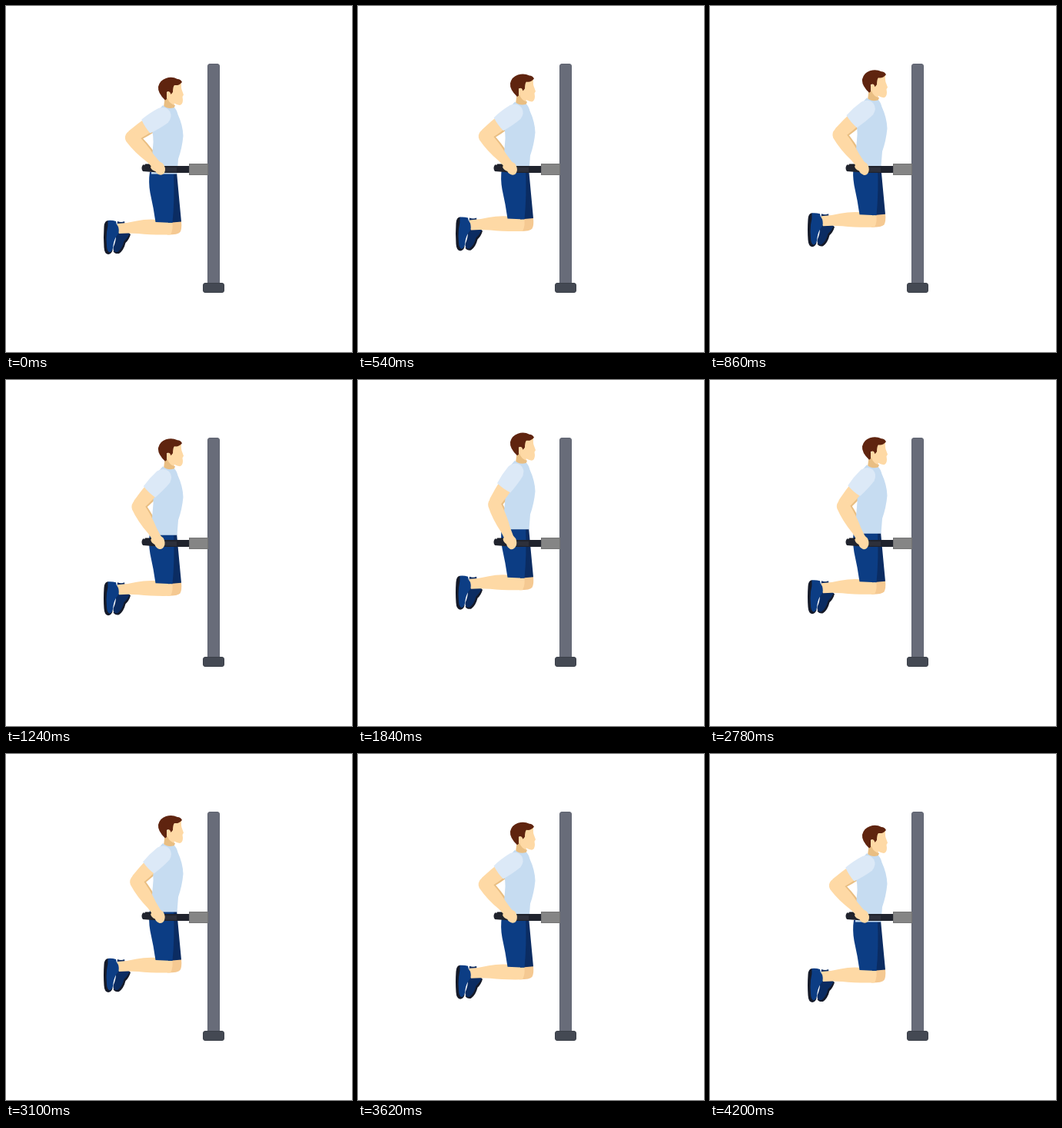
These frames come from a looping animation (450x450 px, 4220 ms). An HTML page:

```html
<!DOCTYPE html>
<html lang="en">
<head>
<meta charset="utf-8">
<title>Bar dips</title>
<style>
  html, body { margin: 0; width: 100%; height: 100%; overflow: hidden; background: #fff; }
  svg { display: block; width: 100vw; height: 100vh; }
  .skin { fill: #fed9a5; }
  .shade { fill: #e9be82; }
  .shirt { fill: #c6dcf1; }
  .sleeve { fill: #dce9f7; }
  .navy { fill: #0c3d84; }
  .deep { fill: #0b2c62; }
  .sole { fill: #151a29; }
  .hair { fill: #5f240f; }
</style>
</head>
<body>
<svg viewBox="0 0 450 450">
  <!-- post -->
  <rect x="262.500" y="75.500" width="15" height="290" rx="2.500" fill="#686c79" stroke="#5f6371"/>
  <rect x="256.500" y="360.500" width="27" height="12" rx="2.500" fill="#444953" stroke="#3b4049"/>

  <g id="farArm"></g>

  <g id="body">
    <!-- far shoe -->
    <path class="sole" d="M159 294 L162 296 Q160 303 155.500 307 Q153 317 147 321 Q142 322 139.500 318 L146 312 Z"/>
    <path class="deep" d="M145 279 Q150 281 154 279 Q155 291 161 295 Q158 301 153.500 305 Q151 315 145 319 Q139 320 139.500 313 Q143 305 143 298 Z"/>
    <!-- lower legs -->
    <path fill="#f5c992" d="M205 278 L228 279 Q229 289 226.500 293 Q224 296.500 210 296.500 Z"/>
    <path class="skin" d="M145 282 Q158 281.500 170 278.500 Q182 276 197 277 L216 279 Q218 289 214 296.500 Q190 297 172 295 Q158 294 147 295 Q143 289 145 282 Z"/>
    <!-- near shoe -->
    <path class="sole" d="M133 278 Q128 278 127.500 286 Q126.500 300 127.500 313 Q128 321.500 133 322 Q137 321.500 138.500 317 L134 284 Z"/>
    <path class="navy" d="M132.500 278 Q138 277.500 143 279 Q143 283 146 286 Q147.500 292 146 295 Q140.500 302 139.500 310 Q139 318 135 319.500 Q131 318 131 311 Q130 302 131 293 Q133 285 132.500 278 Z"/>
    <!-- shorts -->
    <path class="deep" d="M205 215 L222 215 Q225 248 228 279.500 L211 281 Z"/>
    <path class="navy" d="M187 215 L218 215 Q219.500 250 216.500 281 L194.500 280 Q192 262 187.500 242 Q185 228 187 215 Z"/>
    <!-- neck and torso -->
    <path class="skin" d="M208 112 L219 121 L218.500 134 L206 133 Z"/>
    <path class="shade" d="M206.500 119 L210 119 Q213 127 220 128 L218.500 132 Q213 137 205 131 Z"/>
    <path class="shirt" d="M204 128 Q210 134 219 131 Q222 134 223.500 140 Q230 154 230.500 168 Q229 184 224 198 L222.500 217.500 L189 217.500 Q189.500 198 191 183 Q193 168 188 154 Q193 139 204 128 Z"/>
    <!-- head -->
    <path class="skin" d="M212 106 L218 101 L228 99 Q227.500 106 229 109 L231 114.500 L229.500 117 L230 121 Q230 127 226 128 Q219 127 215 122 L209 118 Z"/>
    <path class="hair" d="M207 121.500 Q197 112 198 104 Q200 95.500 208 93 Q216 90.500 223 94 Q227 94 229 98 Q225 103 219 102 Q217 104 217 111 L214.500 114 Q212 109 209 111 Q209 116 209 120 Z"/>
    <ellipse class="skin" cx="211.800" cy="114.500" rx="2.600" ry="4.200" transform="rotate(-15 211.800 114.500)"/>
  </g>

  <!-- handles -->
  <path d="M181 205.500 L194 205.500 L202 208 L202 212 L181 211 Z" fill="#11141c"/>
  <path d="M178 206.500 Q192 206 204 208 L239 208 L239 217 L204 217 L178 215 Q175 211 178 206.500 Z" fill="#20232d"/>
  <path d="M200 210 L222 210 L222 216 L200 215.500 Z" fill="#2d303b"/>
  <rect x="238.500" y="205.500" width="24" height="14" fill="#858585" stroke="#747474"/>

  <g id="nearArm"></g>
</svg>
<script>
const LOOP = 4220, RISE = 25, LEAD = 40, DROP = 0.9;
const SHOULDER = [206, 141], GRIP = [199, 210], UPPER = 53, FORE = 54;
const $ = id => document.getElementById(id);

const upperSkin = 'M20 -9.500 Q36 -9.500 51 -8 Q58 -6 59 0 Q58 6 50 8 Q36 9.500 20 9.800 Z';
const foreSkin = 'M0 8 Q-7 6 -7.500 -1 Q-6 -7 2 -8.500 Q20 -9.500 37 -6.500 L52 -5.500 L52 6 L38 6.500 Q18 10 0 8 Z';
const sleeve = 'M29 -10 Q14 -12 2 -11.500 Q-7 -9 -8 -1 Q-8 8 2 11 Q16 12.500 28.500 11 Q30.500 0 29 -10 Z';
const hand = 'M-11 -6.500 Q-4 -8 2 -7 Q8 -4 9 1 Q10 6 6 8 Q1 9 -2 6.500 Q-7 7.500 -10 4.500 Z';

const part = (cls, d) => `<path class="${cls}" d="${d}"/>`;
$('farArm').innerHTML = `<g>${part('shade', upperSkin)}</g><g>${part('shade', foreSkin)}</g>`;
$('nearArm').innerHTML =
  `<g>${part('skin', upperSkin)}${part('sleeve', sleeve)}</g>` +
  `<g>${part('skin', foreSkin)}</g><g>${part('skin', hand)}</g>`;

const place = (el, x, y, rad) =>
  el.setAttribute('transform', `translate(${x} ${y}) rotate(${rad * 180 / Math.PI})`);

// Two-bone arm from the moving shoulder to the fixed grip.
function poseArm(group, lift, dx, dy) {
  const sx = SHOULDER[0] + dx, sy = SHOULDER[1] - lift + dy;
  const gx = GRIP[0] + dx, gy = GRIP[1];
  const dist = Math.hypot(gx - sx, gy - sy);
  const bend = Math.acos((UPPER ** 2 + dist ** 2 - FORE ** 2) / (2 * UPPER * dist));
  const a = Math.atan2(gy - sy, gx - sx) + bend;
  const ex = sx + UPPER * Math.cos(a), ey = sy + UPPER * Math.sin(a);
  const b = Math.atan2(gy - ey, gx - ex);
  const [upper, fore, palm] = group.children;
  place(upper, sx, sy, a);
  place(fore, ex, ey, b);
  if (palm) place(palm, gx, gy, b - 0.4);
}

// Each 140 ms holds one pose for 100 ms, then two for 20 ms.
function hold(t) {
  if (t < 20) return 0;
  const r = (t - 20) % 140;
  return t - r + (r < 100 ? 0 : r < 120 ? 100 : 120);
}

function draw(t) {
  const lift = RISE / 2 * (1 - Math.cos(2 * Math.PI * (hold(t) + LEAD) / LOOP));
  $('body').setAttribute('transform', `translate(0 ${DROP - lift})`);
  poseArm($('farArm'), lift, 3, 1);
  poseArm($('nearArm'), lift, 0, 0);
}

const start = performance.now();
function tick() {
  draw((performance.now() - start) % LOOP);
  requestAnimationFrame(tick);
}
tick();
</script>
</body>
</html>
```
